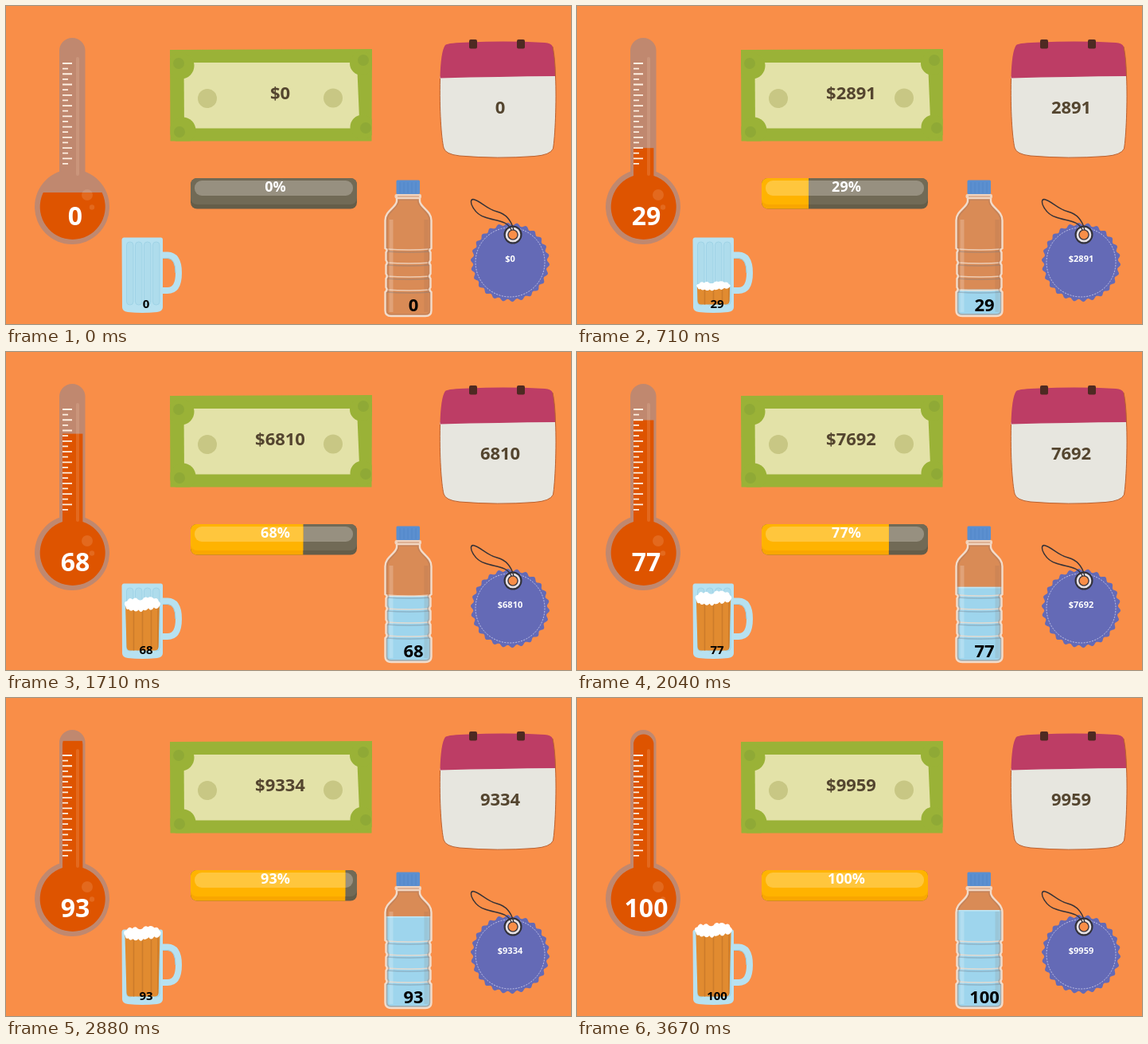
Recreate the animation shown at these times as an HTML page. Size 710 px wide and 399 px high, loop 3.71 s.

```html
<!DOCTYPE html>
<html lang="en">
<head>
<meta charset="utf-8">
<title>Counters</title>
<style>
  html, body { margin: 0; width: 100%; height: 100%; overflow: hidden; background: #f98e48; }
  svg { display: block; width: 710px; height: 399px; }
  text { font-family: "Open Sans", "Noto Sans", sans-serif; font-weight: 700; text-anchor: middle; }
</style>
</head>
<body>
<svg viewBox="0 0 710 399" fill="none">
  <defs>
    <clipPath id="tubeClip"><path d="M71 58a12.700 12.500 0 0 1 25.400 0V213A41 41 0 1 1 71 213Z"/></clipPath>
    <clipPath id="billClip"><path d="M206 55 460 54 459.500 169.500 206.500 169.500Z"/></clipPath>
    <clipPath id="barClip"><rect id="barLevel" x="230.300" y="210" height="50"/></clipPath>
    <clipPath id="beerClip"><path d="M149 280H194L191.500 370Q191 374.500 187 374.500H156Q152 374.500 151.500 370Z"/></clipPath>
    <path id="bottleShape" d="M491 241H520V245C521 253 534.500 257 534.500 269V304Q531 306 533.500 309V319Q531 322 533.500 325V336Q531 339 533.500 342V353Q531 356 534.500 359V382Q534.500 389 527 389H484Q476.500 389 476.500 382V359Q480 356 477.500 353V342Q480 339 477.500 336V325Q480 322 477.500 319V309Q480 306 476.500 304V269C476.500 257 490 253 491 245Z"/>
    <clipPath id="bottleClip"><use href="#bottleShape"/></clipPath>
  </defs>

  <!-- thermometer -->
  <g fill="#c0886f"><rect x="67" y="40" width="32.500" height="190" rx="16"/><circle cx="83" cy="252" r="47"/></g>
  <g clip-path="url(#tubeClip)"><rect id="heat" x="36" width="94" height="300" fill="#de5400"/></g>
  <g fill="#ffd9b8" fill-opacity=".16">
    <rect x="88" y="64" width="4" height="149" rx="2"/>
    <circle cx="102" cy="237" r="7"/><circle cx="108" cy="252.500" r="3.200"/>
  </g>
  <path id="ticks" stroke="#fff0e2" stroke-width="1.800"/>

  <!-- banknote -->
  <g clip-path="url(#billClip)">
    <path d="M200 50H465V175H200Z" fill="#9ab237"/>
    <path d="M223.500 71H441L444.500 153.500H224Z" fill="#e3e2a8"/>
    <g fill="#9ab237">
      <circle cx="220" cy="75" r="16.500"/><circle cx="447" cy="72" r="15"/>
      <circle cx="222" cy="156" r="16.500"/><circle cx="448" cy="152" r="15.500"/>
    </g>
    <g fill="#8fa936">
      <circle cx="217" cy="72" r="7"/><circle cx="449" cy="68" r="7"/>
      <circle cx="218" cy="158" r="7"/><circle cx="452" cy="153" r="7"/>
    </g>
    <g fill="#c8c784"><circle cx="253" cy="116" r="12"/><circle cx="411" cy="115.500" r="12"/></g>
  </g>

  <!-- calendar -->
  <path d="M545.500 88C544.500 130 547 165 550 178Q552 186 570 188Q618 192 664 188.500Q684 187 687.500 179C690 165 692 120 690.500 86Z" fill="#e7e6df"/>
  <path d="M545.500 90.500C546 70 548 54 552 49Q556 46 582 45.500Q630 43.500 677 46Q685 46.500 687 51Q690 65 690.500 88Q620 88.500 545.500 90.500Z" fill="#bd3d65"/>
  <path d="M545.500 91C544.500 130 547 165 550 178Q552 186 570 188Q618 192 664 188.500Q684 187 687.500 179C690 165 692 120 690.500 88Q690 65 687 51" stroke="#b9602f"/>
  <g fill="#4e2a22"><rect x="582" y="42" width="10" height="11.500" rx="2"/><rect x="642" y="42" width="10" height="11.500" rx="2"/></g>

  <!-- progress bar -->
  <g>
    <rect x="232" y="216" width="209" height="38.500" rx="8" fill="#645d49"/>
    <rect x="232" y="216" width="209" height="33" rx="8" fill="#716a56"/>
    <rect x="237" y="219" width="199" height="19" rx="9" fill="#979080"/>
  </g>
  <g clip-path="url(#barClip)">
    <rect x="232" y="216" width="209" height="38.500" rx="8" fill="#f9a600"/>
    <rect x="232" y="216" width="209" height="33" rx="8" fill="#ffb300"/>
    <rect x="237" y="219" width="199" height="19" rx="9" fill="#ffc63d"/>
  </g>

  <!-- mug -->
  <path d="M196 312.500H203Q217 313 217 335Q217 357 203 357H196" stroke="#b7e1f0" stroke-width="8"/>
  <path d="M197 316.500H203Q213 317 213 335" stroke="#98cfe4"/>
  <path d="M145.500 293Q146 290.500 148 290.500H195Q197 290.500 197 293V378Q197 383 190 384Q171 386 153 384Q146 383 146 378Z" fill="#b7e1f0"/>
  <g fill="#aedcec" stroke="#9fd3e6">
    <rect x="151.500" y="296" width="8.500" height="79" rx="4"/><rect x="162.500" y="296" width="8.500" height="79" rx="4"/>
    <rect x="173.500" y="296" width="8.500" height="79" rx="4"/><rect x="184.500" y="296" width="8.500" height="79" rx="4"/>
  </g>
  <g clip-path="url(#beerClip)">
    <g id="beer">
      <path d="M145 0H200V120H145Z" fill="#e18b30"/>
      <path d="M160.500 0V120M171.500 0V120M182.500 0V120M191 0V120" stroke="#cc7b2a" stroke-width="1.600"/>
    </g>
  </g>
  <path id="foam" fill="#fff" d="M-22 11Q-26 5-20 4Q-17-2-13 2Q-9-2-6 2Q-3 4 0 2Q3-3 7 0Q11-3 15 1Q20-1 21 4Q26 7 21 12Q18 15 15 12Q11 18 8 13Q4 17 1 15Q-2 20-5 15Q-9 19-12 15Q-16 18-18 14Q-21 16-22 11Z"/>

  <!-- bottle -->
  <use href="#bottleShape" fill="#d98b56"/>
  <g clip-path="url(#bottleClip)">
    <rect id="water" x="470" width="70" height="140" fill="#9ed5ed"/>
    <rect id="waterRim" x="470" width="70" height="1.500" fill="#c3e6f3"/>
    <path d="M484 268V384" stroke="#fff" stroke-opacity=".2" stroke-width="5"/>
    <path d="M528 268V384" stroke="#7a5a48" stroke-opacity=".12" stroke-width="5"/>
    <path d="M478 308Q506 310 533 308M478 325Q506 327 533 325M478 342Q506 344 533 342M478 359Q506 361 533 359" stroke="#6a7585" stroke-opacity=".35" stroke-width="1.300"/>
    <path d="M478 305Q506 307 533 305M478 322Q506 324 533 322M478 339Q506 341 533 339M478 356Q506 358 533 356" stroke="#f3dccb" stroke-opacity=".8" stroke-width="1.500"/>
    <use href="#bottleShape" stroke="#a9775a" stroke-opacity=".4" stroke-width="6"/>
  </g>
  <use href="#bottleShape" stroke="#f2dccb" stroke-width="2.400"/>
  <rect x="488.500" y="236" width="33.500" height="5.500" rx="2" fill="#f1d3bd"/>
  <path d="M492 239H519" stroke="#c98f6c"/>
  <rect x="490.500" y="218.500" width="29.500" height="17.500" rx="1.500" fill="#5b8fd0"/>
  <path d="M495 221V235M500 221V235M505 221V235M510 221V235M515 221V235" stroke="#5386c8"/>

  <!-- price tag -->
  <path id="tag" fill="#646ab6"/>
  <circle cx="633.500" cy="321.500" r="43.500" stroke="#c9cbed" stroke-width=".9" stroke-dasharray="2 1.500"/>
  <circle cx="637" cy="287" r="8" stroke="#e6e1e2" stroke-width="3"/>
  <circle cx="637" cy="287" r="6" fill="#f98e48" stroke="#3b3333" stroke-width="1.200"/>
  <circle cx="637" cy="287" r="10.500" stroke="#333238" stroke-width="2"/>
  <path d="M638 281C635 269 629 261 617 258C604 255 596 244 587 242.500C580 243 588 261 602 265C616 270 630 269 635 281" stroke="#353237" stroke-width="1.400"/>

  <g id="labels"></g>
</svg>
<script>
const LOOP = 3710, FRAME = 41.7, LAST = 88;
const $ = id => document.getElementById(id);
const set = (id, name, value) => $(id).setAttribute(name, value);

// Percentage keys as [frame, value], joined by a smooth curve
const keys = [[0, 0], [17, 28.91], [29, 49.36], [41, 68.1], [57, 84.35], [69, 93.34], [88, 99.59]];
const slope = i => {
  const [x0, y0] = keys[Math.max(i - 1, 0)], [x1, y1] = keys[Math.min(i + 1, keys.length - 1)];
  return (y1 - y0) / (x1 - x0);
};
function valueAt(frame) {
  let i = 0;
  while (i < keys.length - 2 && frame > keys[i + 1][0]) i++;
  const [x0, y0] = keys[i], [x1, y1] = keys[i + 1], span = x1 - x0, u = (frame - x0) / span, w = 1 - u;
  return y0 * w * w * (1 + 2 * u) + y1 * u * u * (3 - 2 * u)
    + span * u * w * (w * slope(i) - u * slope(i + 1));
}

const percent = v => Math.round(v), amount = v => Math.round(v * 100);
const labels = [
  [87, 275, 32, "#fff", percent],
  [344.5, 117, 22, "#54452f", v => "$" + amount(v)],
  [621, 135, 22, "#54452f", amount],
  [338.5, 233, 18, "#fff", v => percent(v) + "%"],
  [176, 379, 15, "#000", percent],
  [512, 383, 22, "#000", percent],
  [633.5, 321, 11, "#fff", v => "$" + amount(v)]
].map(([x, y, size, fill, format]) => {
  const node = document.createElementNS("http://www.w3.org/2000/svg", "text");
  Object.entries({ x, y, fill, "font-size": size }).forEach(pair => node.setAttribute(...pair));
  $("labels").append(node);
  return { node, format };
});

set("ticks", "d", Array.from({ length: 20 }, (_, i) => `M71 ${72 + i * 6.63}h${i % 2 ? 7 : 12}`).join(""));
set("tag", "d", "M" + Array.from({ length: 360 }, (_, i) => {
  const a = i * Math.PI / 180, r = 48 + 1.6 * Math.sin(26 * a);
  return `${(633.5 + r * Math.cos(a)).toFixed(2)} ${(321.5 + r * Math.sin(a)).toFixed(2)}`;
}).join("L") + "Z");

function draw(now) {
  const frame = Math.min(LAST, Math.floor((now % LOOP + 4) / FRAME));
  const v = valueAt(frame);
  set("heat", "y", 234 - 1.93 * v);
  set("barLevel", "width", v > 99.5 ? 211 : 2.1 * v);

  const waterTop = 392.5 - 1.27 * v;
  set("water", "y", waterTop);
  set("waterRim", "y", waterTop);

  const foamTop = 283 + 0.51 * Math.pow(100 - v, 1.13), foamScale = Math.min(1, v / 45);
  set("beer", "transform", `translate(0 ${foamTop + 9 * foamScale})`);
  set("foam", "transform", `translate(171.5 ${foamTop}) scale(${0.87 + 0.0013 * v} ${foamScale})`);
  set("foam", "visibility", v > 4 ? "visible" : "hidden");

  for (const { node, format } of labels) node.textContent = format(v);
}

const start = performance.now();
function tick() {
  draw(performance.now() - start);
  requestAnimationFrame(tick);
}
tick();
</script>
</body>
</html>
```
